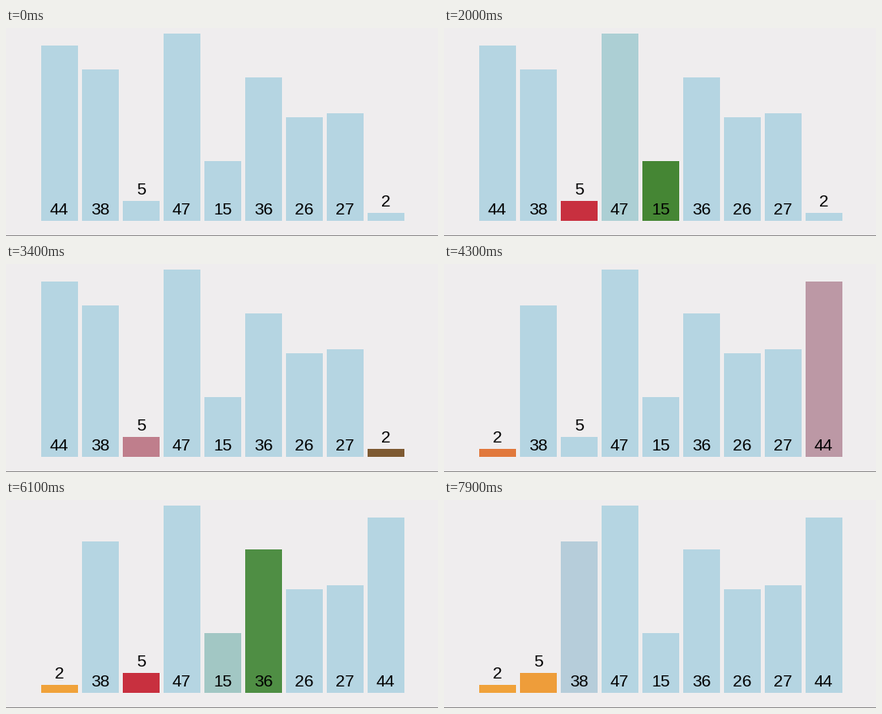
Recreate the animation shown at these times as a matplotlib script. Size 540 px wide and 261 px high, loop 8 s.

```python
import numpy as np
import matplotlib.pyplot as plt
from matplotlib.animation import FuncAnimation
from matplotlib.patches import Rectangle

W, H = 540, 261
FRAMES, INTERVAL = 80, 100
START, STEP = 16, 294.5          # ms
VALUES = [44, 38, 5, 47, 15, 36, 26, 27, 2]
LEFT, PITCH, BAR_W = 43.6, 51, 46
BASE, UNIT, PAD = 241.7, 5, 8


def rgb(code):
    return np.array([int(code[i:i + 2], 16) for i in (0, 2, 4)]) / 255


IDLE, CHECK, LEAST, SORTED = map(rgb, ("b5d5e2", "3c8026", "c8303f", "f0a23a"))


def selection_sort(values):
    """Return every state of the sort as (slot, colour) arrays, one row per bar."""
    n = len(values)
    order = list(range(n))       # bar standing in each slot
    colour = [IDLE] * n
    states = []

    def push():
        states.append((np.argsort(order), np.array(colour)))

    push()
    for i in range(n - 1):
        least = i
        colour[order[i]] = LEAST
        push()
        for j in range(i + 1, n):
            bar = order[j]
            colour[bar] = CHECK
            push()
            colour[bar] = IDLE
            if values[bar] < values[order[least]]:
                colour[order[least]] = IDLE
                colour[bar] = LEAST
                least = j
                push()
        if least != i:
            colour[order[i]] = LEAST
            push()
            order[i], order[least] = order[least], order[i]
            push()
        colour[order[least]] = IDLE
        colour[order[i]] = SORTED
        push()
    return states


def ease(t):
    return 4 * t ** 3 if t < 0.5 else 1 - 4 * (1 - t) ** 3


states = selection_sort(VALUES)

fig = plt.figure(figsize=(W / 72, H / 72), dpi=72, facecolor="#efedee")
ax = fig.add_axes([0, 0, 1, 1])
ax.set_xlim(0, W)
ax.set_ylim(H, 0)
ax.axis("off")
ax.add_patch(Rectangle((0, H - 1), W, 1, fc="#8a898a", lw=0))

bars, labels = [], []
for z, v in enumerate(VALUES):
    top = BASE - v * UNIT
    bars.append(ax.add_patch(Rectangle((0, top), BAR_W, v * UNIT, lw=0, zorder=z + 2)))
    y = (top if v * UNIT < 40 else BASE) - PAD
    labels.append(ax.text(0, y, str(v), family="Liberation Sans", size=21,
                          color="black", ha="center", va="baseline", zorder=z + 2))


def draw(frame):
    steps = max(0, frame * INTERVAL - START) / STEP
    k = int(steps)
    e = ease(steps - k)
    (slot0, col0), (slot1, col1) = states[k], states[k + 1]
    xs = LEFT + PITCH * (slot0 + (slot1 - slot0) * e)
    cols = col0 + (col1 - col0) * e
    for bar, label, x, c in zip(bars, labels, xs, cols):
        bar.set_x(x)
        bar.set_facecolor(c)
        label.set_x(x + BAR_W / 2)
    return bars + labels


anim = FuncAnimation(fig, draw, frames=FRAMES, init_func=lambda: draw(0),
                     interval=INTERVAL, repeat=True, repeat_delay=0)
plt.show()
```
